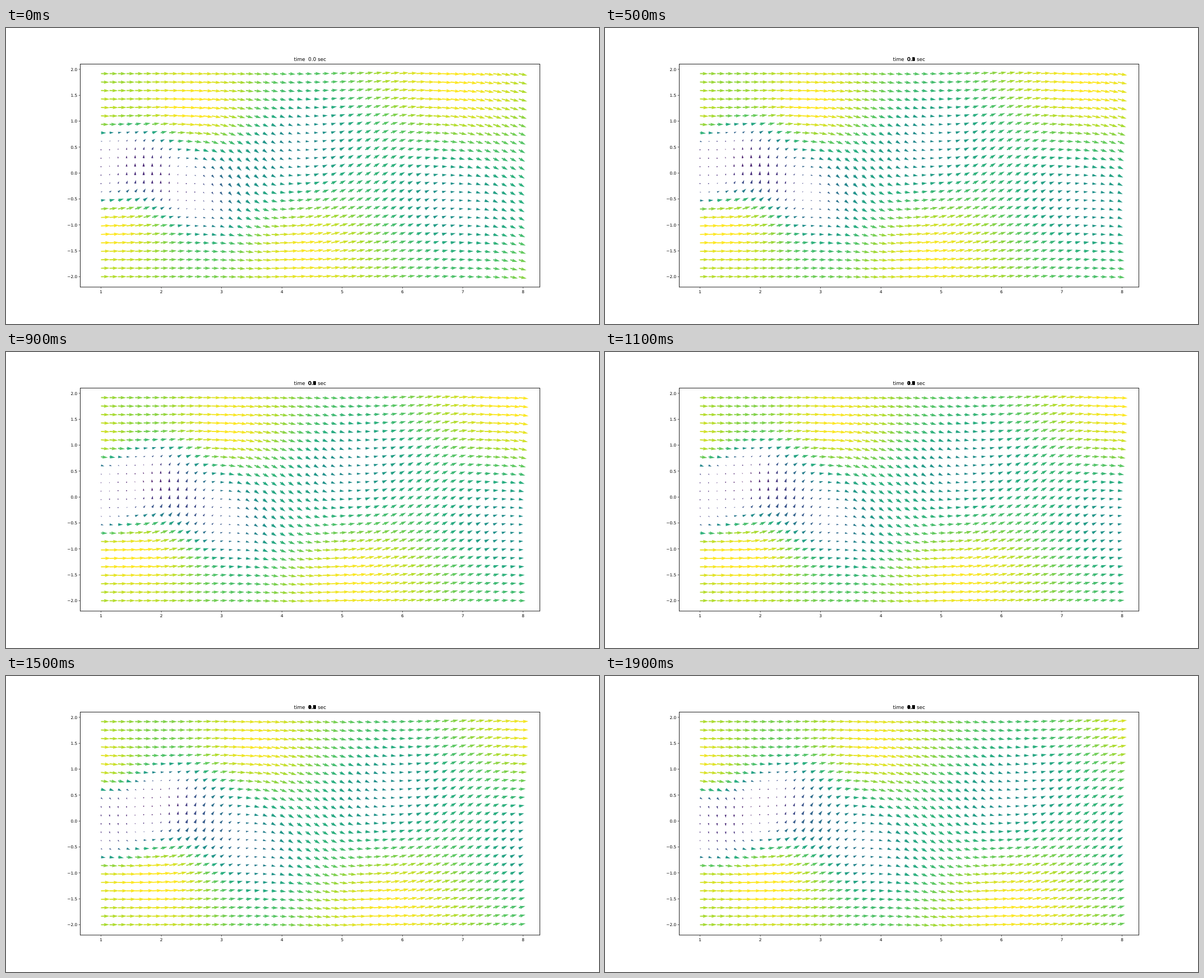
An HTML page with a canvas for the animation above (2000 ms loop, 1058x529 px).

```html
<!DOCTYPE html>
<html>
<head>
<meta charset="utf-8">
<style>
  html, body { margin: 0; width: 100%; height: 100%; overflow: hidden; background: #fff; }
  canvas { display: block; }
</style>
</head>
<body>
<canvas id="stage" width="1058" height="529"></canvas>
<script>
const ctx = document.getElementById('stage').getContext('2d');
const { exp, log, sin, cos, abs, min, max, hypot, atan2, floor } = Math;

const FRAME_MS = 100, FRAMES = 20;
const COLS = 50, ROWS = 25, STEP_X = 14 / 99, STEP_Y = 8 / 49;
const SHAFT = 1.97;            // arrow shaft width in px
const SPEED_PX = 14.5;         // arrow length at unit speed
const FREE_STREAM = 1.02;
const VIRIDIS = ['440154', '472d7b', '3b528b', '2c728e', '21918c', '28ae80', '5ec962', 'addc30', 'fde725']
  .map(hex => [0, 2, 4].map(i => parseInt(hex.slice(i, i + 2), 16)));

const px = x => 169.5 + (x - 1) * 107.58;
const py = y => 444.5 - (y + 2) * 92.65;
const logistic = z => 1 / (1 + exp(-z));
const lobe = z => z * exp(0.5 - z * z / 2);   // odd bump, peaks of 1 at z = 1

function viridis(t) {
  const s = min(max(t, 0), 1) * (VIRIDIS.length - 1);
  const i = min(floor(s), VIRIDIS.length - 2);
  const rgb = VIRIDIS[i].map((c, k) => Math.round(c + (VIRIDIS[i + 1][k] - c) * (s - i)));
  return `rgb(${rgb})`;
}

// Vortex street behind a cylinder: mean wake plus a travelling, meandering wave.
function velocity(x, y, frame) {
  const phase = 1.162 * x - 0.432 * log(1 + exp((4.07 - x) / 0.558)) - 1.56 - 0.121 * frame;
  const onset = logistic((x - 1.2) / 0.35);
  const recovery = logistic((x - 3.1) / 0.45);

  const offset = -0.29 * onset * cos(phase - 0.75);
  const halfWidth = 0.63 + 0.37 * recovery;
  const shear = min(0.28, 0.085 + 0.08 * (x - 1));
  const outside = logistic((abs(y - offset) - halfWidth) / shear);
  const centre = 0.03 - 0.1 * exp(-(((x - 2) / 0.6) ** 2)) + 0.62 * recovery
    - 0.08 * recovery * cos(2 * phase) * exp(-y * y);
  const overshoot = 0.13 * exp(-(((abs(y) - 1.2) / 0.45) ** 2) + (1 - x) / 1.5);
  const u = centre + (FREE_STREAM - centre) * outside + overshoot
    + 0.2 * onset * cos(phase) * lobe(y / (0.8 + 0.1 * x));

  const spread = 0.4 + 0.17 * x;
  const swing = onset * (0.44 + 0.25 * exp((1 - x) / 1.7));
  const v = -swing * sin(phase) * exp(-y * y / (2 * spread * spread))
    - (0.04 + recovery * (0.04 + 0.09 * cos(2 * phase))) * lobe(y);
  return [u, v];
}

function arrow(x, y, u, v) {
  const length = hypot(u, v) * SPEED_PX / SHAFT;
  ctx.fillStyle = viridis((u + 0.12) / 1.32);
  ctx.save();
  ctx.translate(x, y);
  ctx.rotate(-atan2(v, u));
  ctx.scale(SHAFT, SHAFT);
  ctx.beginPath();
  if (length < 1) {
    for (let k = 0; k < 6; k++) ctx.lineTo(0.5 * cos(k * Math.PI / 3), 0.5 * sin(k * Math.PI / 3));
  } else {
    const k = min(1, length / 5), tip = max(length, 5);
    ctx.scale(k, k);
    const half = [[0, 0.5], [tip - 4.5, 0.5], [tip - 5, 1.5], [tip, 0]];
    half.forEach(([a, b]) => ctx.lineTo(a, b));
    half.reverse().forEach(([a, b]) => ctx.lineTo(a, -b));
  }
  ctx.fill();
  ctx.restore();
}

function axes() {
  ctx.strokeStyle = '#222';
  ctx.lineWidth = 1;
  ctx.strokeRect(132.5, 64.5, 820, 398.5);
  ctx.fillStyle = '#000';
  ctx.font = '7.35px "DejaVu Sans", sans-serif';
  ctx.textAlign = 'center';
  for (let x = 1; x <= 8; x++) {
    ctx.fillRect(px(x) - 0.3, 463, 0.6, 2.6);
    ctx.fillText(x, px(x), 473.5);
  }
  ctx.textAlign = 'right';
  for (let y = -2; y <= 2; y += 0.5) {
    ctx.fillRect(129.6, py(y) - 0.3, 2.6, 0.6);
    ctx.fillText(y.toFixed(1).replace('-', '\u2212'), 127.1, py(y) + 2.7);
  }
}

// The clock digits are never cleared, so every earlier time stays underneath.
function title(frame) {
  ctx.fillStyle = '#000';
  ctx.font = '8.82px "DejaVu Sans", sans-serif';
  ctx.textAlign = 'left';
  ctx.fillText('time', 513.8, 58.8);
  ctx.fillText('sec', 556.2, 58.8);
  for (let i = 0; i <= frame; i++) ctx.fillText((i / 10).toFixed(1), 539.3, 58.8);
}

function draw(now) {
  const frame = floor(now / FRAME_MS) % FRAMES;
  ctx.fillStyle = '#fff';
  ctx.fillRect(0, 0, 1058, 529);
  for (let row = 0; row < ROWS; row++) {
    for (let col = 0; col < COLS; col++) {
      const x = 1 + col * STEP_X, y = -2 + row * STEP_Y;
      arrow(px(x), py(y), ...velocity(x, y, frame));
    }
  }
  axes();
  title(frame);
}

let start;
function tick(now) {
  start ??= now;
  draw(now - start);
  requestAnimationFrame(tick);
}
draw(0);
requestAnimationFrame(tick);
</script>
</body>
</html>
```
